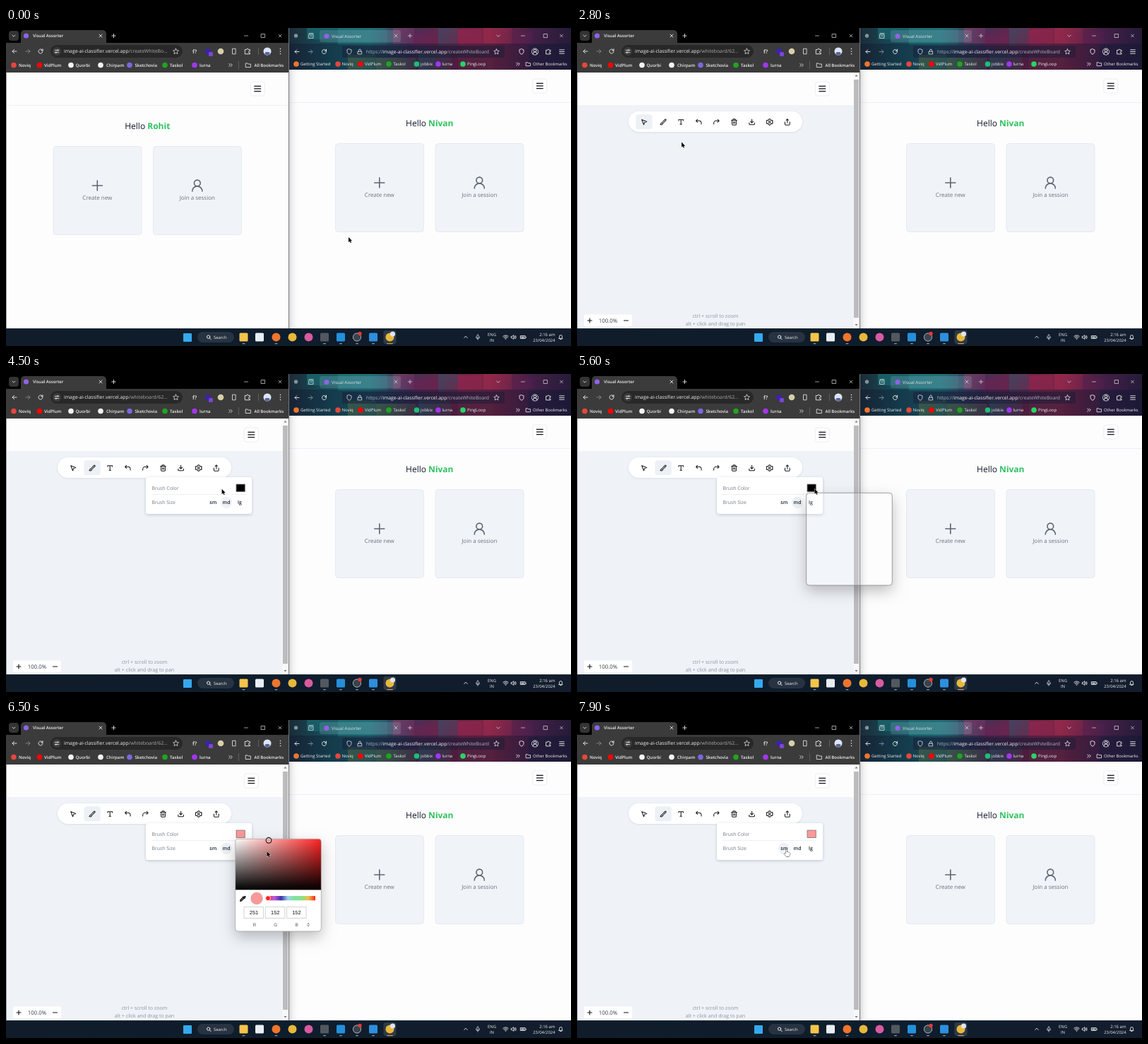
An HTML page with a canvas for the animation above (8000 ms loop, 800 by 450 pixels).

```html
<!DOCTYPE html>
<html lang="en">
<head>
<meta charset="utf-8">
<title>Shared whiteboard</title>
<style>
html, body { margin: 0; width: 100%; height: 100%; overflow: hidden; background: #0f1b2b; }
canvas { display: block; width: 800px; height: 450px; }
</style>
</head>
<body>
<canvas id="stage" width="800" height="450"></canvas>
<script>
const ctx = document.getElementById('stage').getContext('2d');
const LOOP = 8000, STEP = 100;
const UI = '"Open Sans", "Noto Sans", sans-serif';
const ARIAL = '"Liberation Sans", Arial, sans-serif';
const HOST = 'image-ai-classifier.vercel.app';

// Icons on a 24-unit grid
const ICONS = {
  pointer: 'M4 4l7 17 2.5-7.5L21 11z',
  brush: 'M9.5 12 18 3.5a2 2 0 0 1 3 3L12.5 15M7.5 14.5c-2 0-3 1.5-3 3S3 20 2 20c3 2.5 8.5 1.5 8.5-2.5a3 3 0 0 0-3-3z',
  type: 'M4 7V4h16v3M9 20h6M12 4v16',
  undo: 'M8 13 3 8l5-5M3 8h10a8 8 0 0 1 8 8v3',
  redo: 'M16 13l5-5-5-5M21 8H11a8 8 0 0 0-8 8v3',
  trash: 'M3 6h18M19 6v14a2 2 0 0 1-2 2H7a2 2 0 0 1-2-2V6M8 6V4a2 2 0 0 1 2-2h4a2 2 0 0 1 2 2v2M10 11v6M14 11v6',
  download: 'M21 15v4a2 2 0 0 1-2 2H5a2 2 0 0 1-2-2v-4M7 10l5 5 5-5M12 15V3',
  gear: 'M10 2h4l1 3 3 1.5 3-.5 2 3.5-2 2.5 2 2.5-2 3.5-3-.5-3 1.5-1 3h-4l-1-3-3-1.5-3 .5-2-3.5 2-2.5-2-2.5 2-3.5 3 .5 3-1.5zM15 12a3 3 0 1 1-6 0 3 3 0 0 1 6 0z',
  share: 'M4 12v8a2 2 0 0 0 2 2h12a2 2 0 0 0 2-2v-8M16 6l-4-4-4 4M12 2v13',
  user: 'M17 8a5 5 0 1 1-10 0 5 5 0 0 1 10 0zM20 21a8 8 0 0 0-16 0',
  back: 'M20 12H4M11 19l-7-7 7-7',
  forward: 'M4 12h16M13 5l7 7-7 7',
  reload: 'M20 12a8 8 0 1 1-2.5-5.8L20 9M20 3v6h-6',
  star: 'M12 2l3 6.5 7 .8-5.2 4.8 1.4 7L12 17.6 5.8 21l1.4-7L2 9.3l7-.8z',
  shield: 'M12 2l8 3v6c0 6-4 9-8 11-4-2-8-5-8-11V5z',
  lock: 'M5 11h14v10H5zM8 11V7a4 4 0 0 1 8 0v4',
  folder: 'M3 5h6l2 3h10v12H3z',
  close: 'M6 6l12 12M18 6 6 18',
  plus: 'M12 4v16M4 12h16',
  minus: 'M4 12h16',
  menu: 'M3 5h18M3 12h18M3 19h18',
  square: 'M4 4h16v16H4z',
  down: 'M5 9l7 7 7-7',
  up: 'M5 15l7-7 7 7',
  more: 'M5 6l6 6-6 6M13 6l6 6-6 6',
  puzzle: 'M4 6h5a3 3 0 1 1 6 0h5v6a3 3 0 1 0 0 5v4H4z',
  sliders: 'M3 7h10M19 7h2M13 7a3 3 0 1 0 6 0 3 3 0 0 0-6 0M3 17h2M11 17h10M5 17a3 3 0 1 0 6 0 3 3 0 0 0-6 0',
  pane: 'M4 7h16v14H4zM4 3h16M9 13h6',
  page: 'M7 3h10v18H7z',
  search: 'M17 11a6 6 0 1 1-12 0 6 6 0 0 1 12 0zM16 16l5 5',
  mic: 'M12 3a3 3 0 0 0-3 3v6a3 3 0 0 0 6 0V6a3 3 0 0 0-3-3zM5 11a7 7 0 0 0 14 0M12 18v4',
  wifi: 'M2 9a14 14 0 0 1 20 0M5 13a10 10 0 0 1 14 0M9 16.5a4 4 0 0 1 6 0M12 20h.01',
  sound: 'M11 5 6 9H2v6h4l5 4zM15 9a4 4 0 0 1 0 6M18 6a8 8 0 0 1 0 12',
  battery: 'M2 7h17v10H2zM22 11v3M5 11h9M5 14h9',
  bell: 'M5 17h14l-2-3V9a5 5 0 0 0-10 0v5zM10 20h4',
  dropper: 'M3 21l1-4 9-9 3 3-9 9zM12 6l6 6M15 9l3.5-4.5a2 2 0 0 1 2 2L16 10z',
};
for (const k in ICONS) ICONS[k] = new Path2D(ICONS[k]);
const ARROW = new Path2D('M0 0v7.2l1.7-1.5 1.1 2.5 1.2-.5-1.1-2.4h2.2z');
const HAND = new Path2D('M3 .5c.8 0 1.2.5 1.2 1.2v3l3.6.8c.9.2 1.2.8 1.1 1.6l-.6 2.6-.9 1.6H3.6L.8 7.6c-.4-.7.3-1.5 1-1.1l.9.8V1.7c0-.7 0-1.2.3-1.2z');

function rect(x, y, w, h, fill) {
  ctx.fillStyle = fill;
  ctx.fillRect(x, y, w, h);
}
function round(x, y, w, h, r, fill, stroke, line = .8) {
  ctx.beginPath();
  ctx.roundRect(x, y, w, h, r);
  if (fill) { ctx.fillStyle = fill; ctx.fill(); }
  if (stroke) { ctx.strokeStyle = stroke; ctx.lineWidth = line; ctx.stroke(); }
}
function dot(x, y, r, fill, stroke, line = 1) {
  round(x - r, y - r, 2 * r, 2 * r, r, fill, stroke, line);
}
function text(s, x, y, size, color, { align = 'left', weight = 400, font = UI } = {}) {
  ctx.font = `${weight} ${size}px ${font}`;
  ctx.textAlign = align;
  ctx.fillStyle = color;
  ctx.fillText(s, x, y + size * .36);
  return ctx.measureText(s).width;
}
function icon(name, x, y, size, color, line = .9) {
  const k = size / 24;
  ctx.save();
  ctx.translate(x - size / 2, y - size / 2);
  ctx.scale(k, k);
  ctx.strokeStyle = color;
  ctx.lineWidth = line / k;
  ctx.lineCap = ctx.lineJoin = 'round';
  ctx.stroke(ICONS[name]);
  ctx.restore();
}
function icons(list, y, size, color, line) {
  for (const [name, x] of list) icon(name, x, y, size, color, line);
}
function shadow(color, blur, dy) {
  ctx.shadowColor = color;
  ctx.shadowBlur = blur;
  ctx.shadowOffsetY = dy;
}
function fade(x0, y0, x1, y1, ...stops) {
  const g = ctx.createLinearGradient(x0, y0, x1, y1);
  stops.forEach((c, i) => g.addColorStop(i / (stops.length - 1), c));
  return g;
}

function greeting(name, cx, y) {
  ctx.font = `400 12px ${UI}`;
  const w1 = ctx.measureText('Hello ').width;
  ctx.font = `700 12px ${UI}`;
  const x = cx - (w1 + ctx.measureText(name).width) / 2;
  text('Hello ', x, y, 12, '#111827');
  text(name, x + w1, y, 12, '#2fc25f', { weight: 700 });
}
function burger(x, y) {
  round(x - 10, y - 10, 20, 20, 3.5, '#fff', '#e6e9ee');
  for (const d of [-3.6, 0, 3.6]) rect(x - 4.9, y + d - .7, 9.8, 1.3, '#16181d');
}
function home(x, y, name) {
  rect(x, y, 401, 425 - y, '#fdfdfe');
  rect(x, y + 46, 401, .8, '#eceef2');
  greeting(name, x + 200.3, y + 75.5);
  const cards = [['plus', 'Create new', 67], ['user', 'Join a session', 208.5]];
  for (const [glyph, label, dx] of cards) {
    const cx = x + dx + 62.5;
    round(x + dx, y + 104.5, 125, 125, 4, '#f0f3f8', '#e1e7ee');
    icon(glyph, cx - .2, y + 160, 21, '#5d6673', 1.6);
    text(label, cx - .2, y + 177.5, 8, '#6b7280', { align: 'center' });
  }
}

function chrome(board) {
  rect(0, 0, 400, 22, '#000');
  round(4, 4, 14, 14, 4, '#343434');
  icon('down', 11, 11, 7, '#ddd');
  round(21, 3, 121, 24, 5, '#3b3b3b');
  rect(0, 21, 400, 42, '#3b3b3b');
  dot(28.5, 11, 3.6, '#8f63e8');
  text('Visual Assorter', 38, 11, 6, '#eee', { weight: 600 });
  icons([['close', 134], ['plus', 152.5]], 11, 8, '#e4e4e4');
  icons([['minus', 340], ['square', 364], ['close', 388]], 11, 7.5, '#ddd', .7);

  icon('back', 12, 33, 9, '#eee');
  icon('forward', 31, 33, 9, '#8a8a8a');
  icon('reload', 49, 33, 9, '#eee');
  round(63, 24, 187, 18, 9, '#282828');
  dot(72, 33, 6, '#3c3c3c');
  icon('sliders', 72, 33, 7.5, '#eee', .8);
  const w = text(HOST, 82, 33, 6.85, '#f2f2f2');
  text(board ? '/whiteboard/62...' : '/createWhiteBo...', 82 + w, 33, 6.85, '#aaa');
  icon('star', 240.5, 33, 9.5, '#ddd', .8);
  text('f?', 264, 33, 7.5, '#f4f4f4', { weight: 600 });
  dot(286, 33, 4, '#3b24a8');
  round(287, 34, 6, 6, 1.5, '#7b45d6');
  dot(304, 33, 4.3, '#d8cfa9');
  icon('page', 323, 33, 10, '#ddd');
  icon('puzzle', 342, 33, 10, '#eee');
  rect(357, 28, .8, 10, '#686868');
  dot(370, 33, 5.5, '#dfe4f1');
  round(366.5, 34, 7, 4, 2, '#5067a3');
  for (const d of [-3.5, 0, 3.5]) dot(388.5, 33 + d, .8, '#eee');

  const marks = [['Noviq', 11, '#e5473b', 18], ['VidPlum', 47.5, '#f00', 54], ['Quorbi', 92, '#f4f4f4', 98.5],
    ['Chirpam', 134, '#f4f4f4', 142], ['Sketchovia', 175, '#7769e0', 182.5], ['Taskol', 225, '#1ea51e', 232], ['lurna', 267, '#a236ef', 274]];
  for (const [label, ix, color, tx] of marks) {
    dot(ix, 52.5, 3.8, color);
    text(label, tx, 52.5, 6.1, '#eee', { weight: 600 });
  }
  icon('more', 318, 52.5, 8, '#ddd');
  rect(329, 47, .8, 11, '#686868');
  icon('folder', 343, 52.5, 9, '#ddd');
  text('All Bookmarks', 351.5, 52.5, 6, '#eee', { weight: 600 });
}

function firefox() {
  rect(400, 0, 400, 59, fade(400, 0, 800, 0, '#1b2b38', '#17505c', '#1f6670', '#453058', '#6f2248', '#7d2546', '#452048', '#251b38'));
  const patches = [[426, 0, 44, 16, '#1a7f85'], [470, 0, 70, 24, '#248489'], [548, 0, 30, 22, '#a23a6a'], [576, 8, 34, 20, '#7a1d50'],
    [612, 0, 28, 26, '#245f72'], [640, 2, 34, 24, '#a22852'], [676, 0, 40, 22, '#a82c50'], [716, 6, 30, 26, '#5c2050'],
    [484, 38, 40, 21, '#8aa04a'], [524, 42, 56, 17, '#7d8f45'], [584, 36, 46, 23, '#2f7770'], [640, 38, 50, 21, '#7a3550'], [740, 24, 60, 35, '#1c2040']];
  ctx.globalAlpha = .5;
  for (const [x, y, w, h, c] of patches) rect(x, y, w, h, fade(x, y, x + w, y + h, c, c + '60'));
  ctx.globalAlpha = 1;
  rect(400, 22, 400, 37, 'rgba(14,20,46,.36)');
  round(444, 3, 115, 17, 3, 'rgba(190,220,230,.17)');
  dot(410.5, 11, 2.7, '#83939a');
  icon('pane', 432, 11, 9, '#d7e6e8', .8);
  dot(454, 11.5, 3.6, '#8f63e8');
  text('Visual Assorter', 461, 11.5, 6.1, '#dce6e8');
  icons([['close', 552], ['plus', 572], ['down', 697]], 11, 8, '#d8d2dc', .8);
  icons([['minus', 732], ['square', 764], ['close', 786.5]], 11, 7.5, '#ddd', .7);

  round(476, 25, 230, 17, 3, 'rgba(24,28,56,.5)');
  icon('back', 412, 33.5, 9, '#eee');
  icon('forward', 431, 33.5, 9, '#84909c');
  icon('reload', 450.5, 33.5, 9, '#eee');
  icons([['shield', 486], ['lock', 501], ['star', 694.5]], 33.5, 9, '#dde3e8', .8);
  let x = 510;
  for (const [s, c] of [['https://', '#aab4bd'], [HOST, '#f5f5f5'], ['/createWhiteBoard', '#aab4bd']]) x += text(s, x, 33.5, 6.8, c);
  icons([['shield', 730], ['user', 749], ['puzzle', 768], ['menu', 787]], 33.5, 9, '#eee', .9);
  dot(749, 33.5, 4.6, null, '#eee', .8);

  const marks = [['Getting Started', 411, '#f0752e', 417], ['Noviq', 470, '#e5473b', 475.5], ['VidPlum', 502, '#f00', 508],
    ['Taskol', 542, '#1ea51e', 548.5], ['jobbix', 581.5, '#1dbf73', 587], ['lurna', 612, '#a236ef', 617.5], ['PingLoop', 647, '#2bd366', 653]];
  for (const [label, ix, color, tx] of marks) {
    dot(ix, 51, 3.8, color);
    text(label, tx, 51, 6, '#f1f1f1');
  }
  icon('more', 725, 51, 8, '#eee');
  icon('folder', 739.5, 51, 8, '#eee', .8);
  text('Other Bookmarks', 746, 51, 5.9, '#f1f1f1');
}

function taskbar() {
  rect(0, 425, 800, 25, fade(0, 0, 800, 0, '#101c2a', '#0e1d2c', '#131d2d'));
  rect(0, 425, 800, .7, '#2b3745');
  round(251, 432, 12, 12, 1, '#35a9ee');
  round(271, 430, 52, 15, 7.5, '#273341');
  icon('search', 287, 437.5, 8.5, '#eee', 1);
  text('Search', 294, 437.5, 5.9, '#eee');
  round(534.5, 428, 18, 19, 3, '#2d3947');
  const apps = [[336.5, '#f4c44b'], [359, '#e8eef4'], [382.5, '#f0752e', 1], [405.5, '#e8b83b', 1], [428.5, '#d95aa0', 1],
    [451, '#53585f'], [474, '#2490dc'], [497, '#39424d', 1], [520, '#2d8fdd'], [543.5, '#e8b83b', 1]];
  for (const [x, c, disc] of apps) round(x - 6, 431.5, 12, 12, disc ? 6 : 1.5, c);
  dot(497, 437.5, 5.6, null, '#c8cdd2', .8);
  dot(501, 432.5, 2.7, '#e33b3b');
  dot(547.5, 433, 3.6, '#dfe4f1');
  for (const x of [336.5, 382.5, 451, 474, 497, 520]) round(x - 2, 446, 4, 1.2, .6, '#8f99a4');
  round(539, 446, 9, 1.2, .6, '#d29b62');

  icon('up', 651, 437.5, 8, '#eee');
  icon('mic', 668, 437.5, 9, '#b5c0cb');
  text('ENG', 688, 433.5, 5.9, '#eee', { align: 'center' });
  text('IN', 688, 441.5, 5.9, '#eee', { align: 'center' });
  icons([['wifi', 707.5], ['sound', 719], ['battery', 732.5]], 437.5, 9, '#f1f1f1');
  text('2:16 am', 777.5, 433.5, 6, '#eee', { align: 'right' });
  text('23/04/2024', 777.5, 441.5, 5.9, '#eee', { align: 'right' });
  icon('bell', 785.5, 437.5, 9, '#eee');
}

const TOOLS = ['pointer', 'brush', 'type', 'undo', 'redo', 'trash', 'download', 'gear', 'share'];
const toolX = i => i ? 97 + 25.1 * i : 95;

function whiteboard(tool, typeHover) {
  rect(0, 63, 392, 46, '#fdfdfe');
  rect(0, 109, 392, 316, '#eff3f8');
  rect(391.5, 63, 8.5, 362, '#f8f8f8');
  rect(392, 73, 7, 337, '#bcbcbe');
  ctx.fillStyle = '#757575';
  for (const [y, d] of [[67.5, -1], [420, 1]]) {
    ctx.beginPath();
    ctx.moveTo(393.5, y - d);
    ctx.lineTo(397.5, y - d);
    ctx.lineTo(395.5, y + 1.4 * d);
    ctx.fill();
  }
  burger(347.3, 86);
  ctx.save();
  shadow('rgba(30,50,80,.13)', 3, .8);
  round(73, 118, 246, 29, 14.5, '#fff');
  ctx.restore();
  TOOLS.forEach((name, i) => {
    const x = toolX(i);
    if (name === tool || (typeHover && name === 'type')) round(x - 11.7, 122.3, 23.4, 21, 4, '#edf1f6');
    icon(name, x, 133, 10, '#16181d', 1.05);
  });
  round(10, 405.5, 68, 16.5, 2, '#fff');
  icon('plus', 18, 414, 9, '#111', 1.1);
  text('100.0%', 44, 414, 7.8, '#333a45', { align: 'center' });
  icon('minus', 69.5, 414, 9, '#111', 1.1);
  text('ctrl + scroll to zoom', 196, 407.5, 7.1, '#8b929d', { align: 'center' });
  text('alt + click and drag to pan', 196, 418, 7.1, '#8b929d', { align: 'center' });
}

function brushMenu(color, size) {
  ctx.save();
  shadow('rgba(20,35,60,.22)', 4, 1.2);
  round(198, 146, 150, 52, 3, '#fff');
  ctx.restore();
  text('Brush Color', 206.5, 161.5, 6.9, '#737b88');
  rect(206, 170.3, 133, .7, '#e6e9ee');
  text('Brush Size', 206.5, 182, 6.9, '#737b88');
  round(326, 156, 12.3, 10.5, 0, color, '#777', .8);
  for (const [s, x] of [['sm', 293.3], ['md', 312], ['lg', 331]]) {
    if (s === size) dot(x, 182, 8.2, '#eef2f7');
    text(s, x, 182, 6.9, '#16202e', { align: 'center', weight: 600 });
  }
}

function picker(ready, picked) {
  const [x, y, w, h] = [324.7, 168.3, 121.6, 130.7];
  const rgb = picked ? [251, 152, 152] : [0, 0, 0];
  const color = `rgb(${rgb})`;
  ctx.save();
  const outside = new Path2D();
  outside.rect(0, 0, 800, 450);
  outside.roundRect(x, y, w, h, 4);
  ctx.clip(outside, 'evenodd');
  shadow('rgba(0,0,0,.25)', 20, 8);
  round(x, y, w, h, 4, '#fff');
  ctx.restore();
  if (!ready) return round(x, y, w, h, 4, 'rgba(255,255,255,.15)', '#888', .8);

  round(x, y, w, h, 4, '#fff');
  ctx.save();
  ctx.clip();
  rect(x, y, w, 72, fade(x, 0, x + w, 0, '#fff', '#f22'));
  rect(x, y, w, 72, fade(0, y, 0, y + 72, 'rgba(0,0,0,0)', '#000'));
  ctx.restore();
  round(x, y, w, h, 4, null, '#999', .7);
  const [px, py] = picked ? [372, 170.3] : [x, y + 72];
  dot(px, py, 3.7, color, '#222', 1.5);
  dot(px, py, 2.7, null, '#fff', .7);

  icon('dropper', 335.5, 252.5, 10, '#111', 1.4);
  dot(355, 252.5, 8.4, color, '#aaa', .5);
  rect(370, 249, 68, 6.3, fade(370, 0, 438, 0, '#f22', '#c05be0', '#4030a8', '#9ad4ee', '#7fe39a', '#8be08a', '#edc048', '#f22'));
  dot(371, 252.2, 3.5, '#f22', '#fff', .8);
  [352, 382, 412].forEach((cx, i) => {
    round(cx - 15 + i * .3, 264.5, 27.5, 16, 0, '#fff', '#c8c8c8', .8);
    text(rgb[i], cx - 1 + i * .2, 272.5, 7.4, '#111', { align: 'center', font: ARIAL });
    text('RGB'[i], cx - .3, 290, 6.4, '#555', { align: 'center', font: ARIAL });
  });
  icon('up', 428, 288.5, 3.6, '#222', .8);
  icon('down', 428, 291.3, 3.6, '#222', .8);
}

// Mouse path: time, x, y
const PATH = [[0, 485, 296], [900, 148.3, 235.5], [2250, 148.3, 235.5], [3100, 148, 132], [3200, 147, 132], [3500, 130.5, 131.5],
  [3650, 123, 132], [3750, 123, 132], [4000, 215, 158], [4700, 328, 164], [4900, 336, 162.5], [5650, 336.5, 162.5], [6000, 372, 170],
  [6200, 372, 170], [6500, 369.5, 186], [7200, 287, 195], [7400, 287, 195], [7800, 295.8, 182], [8000, 295.8, 182]];

function mouse(t) {
  let i = 1;
  while (i < PATH.length - 1 && PATH[i][0] < t) i++;
  const [t0, x0, y0] = PATH[i - 1], [t1, x1, y1] = PATH[i];
  const k = (t - t0) / (t1 - t0), e = k * k * (3 - 2 * k);
  return [x0 + (x1 - x0) * e, y0 + (y1 - y0) * e];
}
function cursor(t) {
  const [x, y] = mouse(t);
  const hand = (t >= 800 && t < 1200) || (t >= 2900 && t < 3900) || t >= 7700;
  ctx.save();
  ctx.translate(hand ? x - 3 : x, y);
  ctx.lineJoin = 'round';
  ctx.lineWidth = hand ? .9 : 1;
  ctx.strokeStyle = hand ? '#222' : 'rgba(255,255,255,.75)';
  ctx.fillStyle = hand ? '#fff' : '#000';
  ctx.stroke(hand ? HAND : ARROW);
  ctx.fill(hand ? HAND : ARROW);
  ctx.restore();
}

function draw(t) {
  const board = t >= 1200, menu = t >= 3700, picked = t >= 6100;
  firefox();
  home(399.5, 59, 'Nivan');
  burger(755.8, 82);
  rect(400, 59, 13, 366, fade(400, 0, 413, 0, 'rgba(0,0,0,.16)', 'rgba(0,0,0,.04)', 'rgba(0,0,0,0)'));
  chrome(board);
  if (board) {
    whiteboard(menu ? 'brush' : 'pointer', t >= 3000 && t < 3600);
  } else {
    home(0, 63, 'Rohit');
    burger(356.2, 86);
  }
  rect(0, 63, .8, 362, '#85888c');
  rect(400, 0, 1, 425, '#75777b');
  taskbar();
  if (menu) brushMenu(picked ? '#fb9898' : '#000', t >= 7800 ? 'sm' : 'md');
  if (t >= 5500 && t < 7400) picker(t >= 5700, picked);
  cursor(t);
}

ctx.textRendering = 'geometricPrecision';
function tick(now) {
  draw(Math.floor(now % LOOP / STEP) * STEP);
  requestAnimationFrame(tick);
}
draw(0);
requestAnimationFrame(tick);
</script>
</body>
</html>
```
